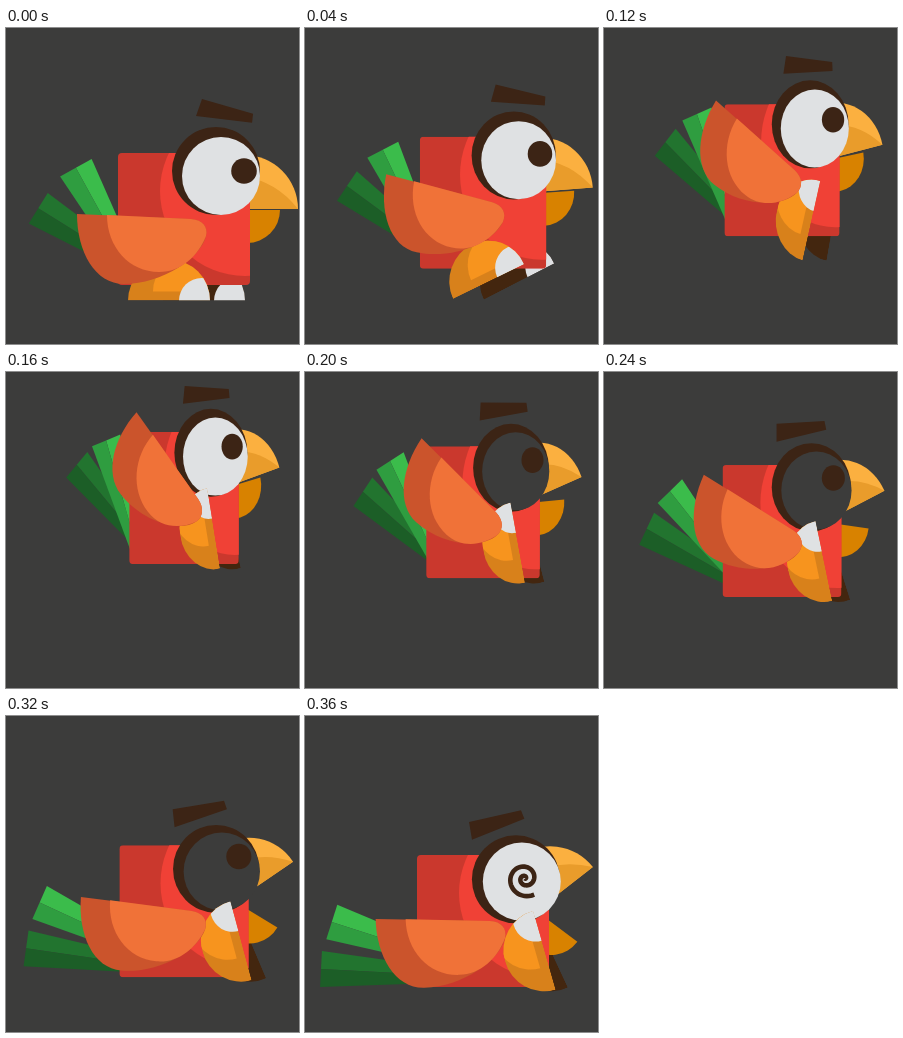
Write an HTML page that moves like this. It is 293x316 px and loops after 0.68 s.

```html
<!DOCTYPE html>
<html lang="en">
<head>
<meta charset="utf-8">
<title>Flapping bird</title>
<style>
  html, body { margin: 0; width: 100%; height: 100%; overflow: hidden; background: #3c3c3b; }
  svg { display: block; width: 293px; height: 316px; }
  #upper { --light: #3bbc4b; --dark: #2f9d40; }
  #lower { --light: #22742f; --dark: #1c5e27; }
  #near { --light: #f7941e; --dark: #d8811b; }
  #far { --light: #43260f; --dark: #43260f; }
  .brown { fill: #3c2415; }
</style>
</head>
<body>
<svg viewBox="0 0 293 316">
  <defs>
    <g id="feather">
      <path fill="var(--light)" d="M0-18 115-8V0H0Z"/>
      <path fill="var(--dark)" d="M0 0H115V8L0 18Z"/>
    </g>
    <clipPath id="half"><path d="M-41 0A41 41 0 0 1 41 0Z"/></clipPath>
    <g id="foot" clip-path="url(#half)">
      <path fill="var(--dark)" d="M-41-41H41V0H-41Z"/>
      <path fill="var(--light)" d="M-16-9A36 36 0 0 1 20-45H41V-9Z"/>
      <circle cx="32.7" r="22.7" fill="#dfe1e3"/>
    </g>
    <clipPath id="box"><rect x="112" y="125" width="132" height="132" rx="4"/></clipPath>
  </defs>

  <g id="bird">
    <use id="lower" href="#feather"/>
    <use id="upper" href="#feather"/>
    <use id="far" href="#foot"/>
    <path id="jaw" fill="#d88200" d="M-33 0H33A33 33 0 0 1-33 0Z"/>
    <g id="beak">
      <path fill="#fbb040" d="M0 0V-54A54 54 0 0 1 54 0Z"/>
      <path fill="#e99c2b" d="M0 0V-32Q32-28 54 0Z"/>
    </g>
    <g clip-path="url(#box)">
      <rect x="112" y="125" width="132" height="132" fill="#ca382d"/>
      <circle cx="239" cy="163" r="85" fill="#f04136"/>
    </g>
    <circle id="ring" class="brown" cx="210" cy="143" r="44"/>
    <circle id="white" cx="215" cy="148" r="39"/>
    <circle id="pupil" class="brown" cx="238" cy="143" r="12.8"/>
    <path id="spiral" fill="none" stroke="#3c2415" stroke-width="4.6"/>
    <use id="near" href="#foot"/>
    <g id="wing">
      <path fill="#cb542c" d="M71 186C71 224 89 256 118 256C156 256 195 230 200 208C202 199 197 192 185 191Z"/>
      <path fill="#f07238" d="M101 187C101 219 123 244 153 244C175 244 192 228 200 208C202 199 197 192 185 191Z"/>
    </g>
    <path id="brow" class="brown" d="M0 0H53.2L54.7 8.9-1 18Z"/>
  </g>
</svg>
<script>
  const LOOP = 680, STEP = 40, PEAK = 4, LAST = 9;

  const el = id => document.getElementById(id);
  const put = (id, ...ops) => el(id).setAttribute('transform', ops.join(' '));
  const move = (x, y) => `translate(${x} ${y})`;
  const turn = (a, x = 0, y = 0) => `rotate(${a} ${x} ${y})`;
  const lerp = (a, b, u) => a + (b - a) * u;

  // The fall starts and lands a little slower than its middle
  const fall = u => u + .05 * (Math.sin(Math.PI * u) - Math.sin(2 * Math.PI * u));

  function spiralPath(cx, cy, radius, turns, end) {
    let d = '';
    for (let i = 0; i <= 90; i++) {
      const u = i / 90, r = radius * u ** 1.3, a = end + (1 - u) * turns * 2 * Math.PI;
      d += `${i ? 'L' : 'M'}${cx + r * Math.cos(a)} ${cy + r * Math.sin(a)}`;
    }
    return d;
  }
  el('spiral').setAttribute('d', spiralPath(220, 148.5, 18.5, 2, 1.05));

  function pose(k) {
    // Even rise to the peak of the jump, then the eased fall
    const jump = (start, peak, end) => k < PEAK
      ? lerp(start, peak, k / PEAK)
      : lerp(peak, end, fall((k - PEAK) / (LAST - PEAK)));

    put('bird', move(178, jump(0, -65, 14)), `scale(${jump(1, .83, 1)} 1)`, move(-178, 0));
    put('wing', turn(jump(0, 46.9, -1.4), 189, 203));
    put('upper', move(114, 220), turn(jump(61.2, 71, 17.8)), move(-91.6, 0));
    put('lower', move(138, 241), turn(jump(29.9, 43, .9)), move(-122, 0), turn(2));
    put('jaw', move(jump(241, 238, 246), jump(182, 178.5, 192)), turn(jump(0, -14, 37)));

    const leg = [
      move(jump(165.5, 166.5, 193), jump(225, 228, 231)),
      turn(jump(0, -101, -106)),
      move(-2.5, 47.6)
    ];
    put('near', ...leg);
    put('far', move(35 - 3.2 * k, 0), ...leg, turn(-k));

    // The face drifts steadily through the whole jump
    put('brow', move(196 - 4.9 * k + .15 * k * k, 71 + 1.7 * k + .07 * k * k), turn(16.2 - 3.2 * k));
    put('beak', move(238 + .8 * k, 181 - 1.2 * k), turn(-4.2 * k));
    put('ring', move(.1 * k, .7 * k));
    put('white', move(.2 * k, .4 * k));
    put('pupil', move(-.5 * k, -.85 * k));

    const dizzy = k === LAST;
    el('white').setAttribute('fill', k <= PEAK || dizzy ? '#dfe1e3' : '#3c3c3b');
    el('pupil').style.display = dizzy ? 'none' : '';
    el('spiral').style.display = dizzy ? '' : 'none';
  }

  let shown = -1;
  function tick() {
    const k = Math.min(LAST, Math.floor(performance.now() % LOOP / STEP));
    if (k !== shown) pose(shown = k);
    requestAnimationFrame(tick);
  }
  tick();
</script>
</body>
</html>
```
